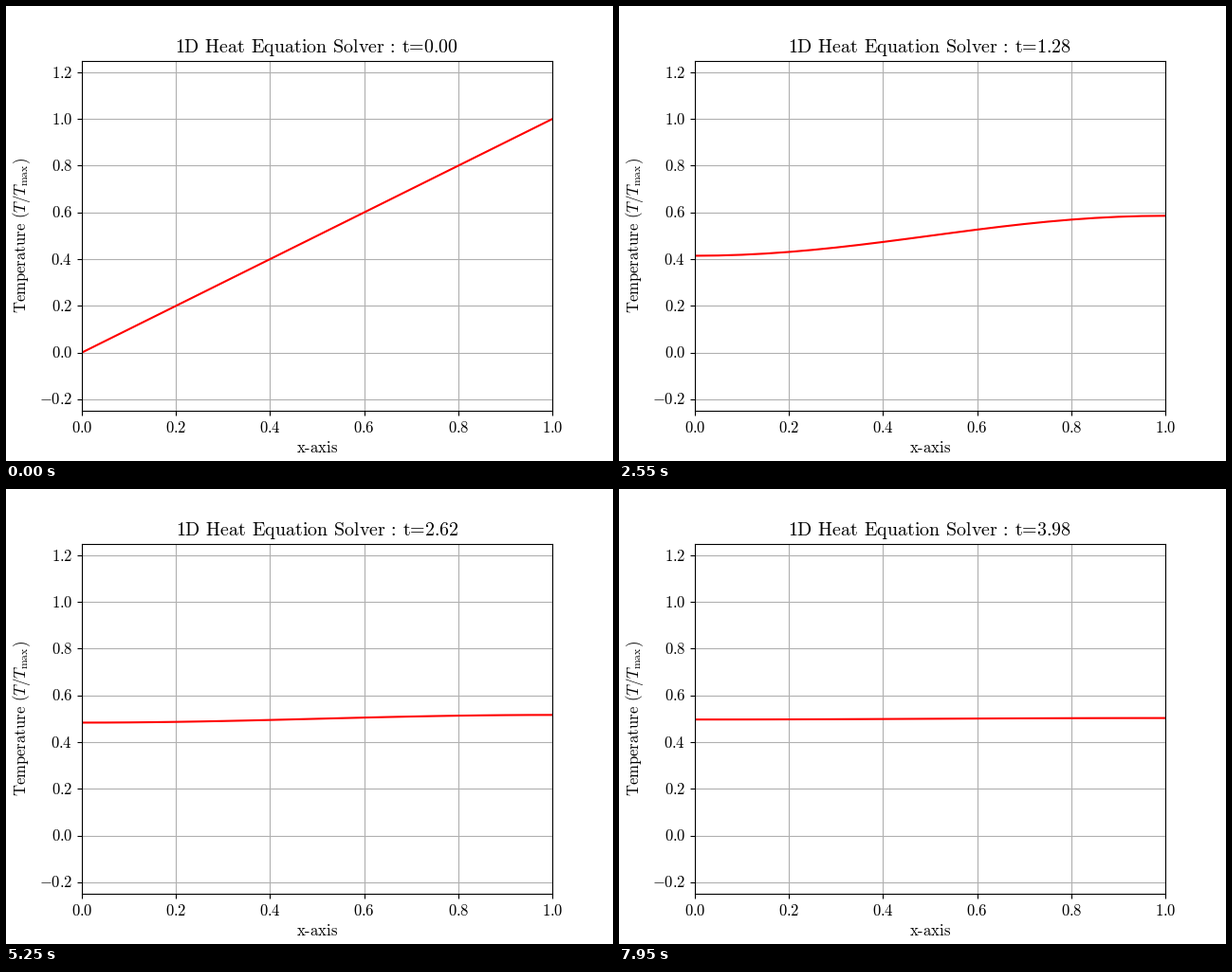
These frames come from a looping animation (640x480 px, 8000 ms). A matplotlib script:

```python
import numpy as np
import matplotlib.pyplot as plt
from matplotlib.animation import FuncAnimation

W, H, DPI = 640, 480, 100
FRAMES, INTERVAL = 160, 50
CELLS = 20          # grid cells along the rod
ALPHA = 0.125       # diffusivity
DT = 0.025          # simulated time per frame
SUBSTEPS = 2

plt.rcParams["mathtext.fontset"] = "cm"


def solve():
    """Implicit heat equation with insulated ends, one row per frame."""
    n = CELLS + 1
    lap = -2 * np.eye(n) + np.eye(n, k=1) + np.eye(n, k=-1)
    lap[0, 1] = lap[-1, -2] = 2
    k = ALPHA * DT / SUBSTEPS * CELLS**2
    step = np.linalg.matrix_power(np.linalg.inv(np.eye(n) - k * lap), SUBSTEPS)
    rows = [np.linspace(0, 1, n)]
    for _ in range(FRAMES - 1):
        rows.append(step @ rows[-1])
    return rows


def rm(s):
    return r"\text{%s}" % s


def title_text(i):
    return "$" + rm(f"1D Heat Equation Solver : t={i * DT:.2f}") + "$"


fig = plt.figure(figsize=(W / DPI, H / DPI), dpi=DPI, facecolor="white")
ax = fig.add_axes([0.125, 0.11, 0.775, 0.77])
ax.set(xlim=(0, 1), ylim=(-0.25, 1.25))
xticks = np.linspace(0, 1, 6)
yticks = np.linspace(-0.2, 1.2, 8)
ax.set_xticks(xticks, [""] * len(xticks))
ax.set_yticks(yticks, [""] * len(yticks))
ax.grid(True, color="#b0b0b0", linewidth=0.8)


def put(x, y, s, size=12, ha="center", **kw):
    """Text with its baseline at pixel (x, y), y counted from the top."""
    return fig.text(x / W, 1 - y / H, s, size=size, ha=ha, va="baseline", **kw)


for v in xticks:
    put(80 + 496 * v, 450, "$" + rm(f"{v:.1f}") + "$")
for v in yticks:
    sign = "-" if v < -0.01 else ""
    y = 427.2 - (v + 0.25) / 1.5 * 369.6
    put(70.3, y + 5.6, "$" + sign + rm(f"{abs(v):.1f}") + "$", ha="right")

put(328, 471, "$" + rm("x-axis") + "$")
ylabel = "$" + rm("Temperature (") + r"T/T_{\mathrm{max}}" + rm(")") + "$"
put(21, 242.4, ylabel, rotation=90, rotation_mode="anchor")
title = put(328, 49.3, title_text(0), size=14.4)

temps = solve()
xs = np.linspace(0, 1, CELLS + 1)
line, = ax.plot(xs, temps[0], color="red", linewidth=1.5)


def update(i):
    line.set_ydata(temps[i])
    title.set_text(title_text(i))
    return line, title


anim = FuncAnimation(fig, update, frames=FRAMES, interval=INTERVAL,
                     init_func=lambda: update(0), repeat=True, repeat_delay=0)
plt.show()
```
